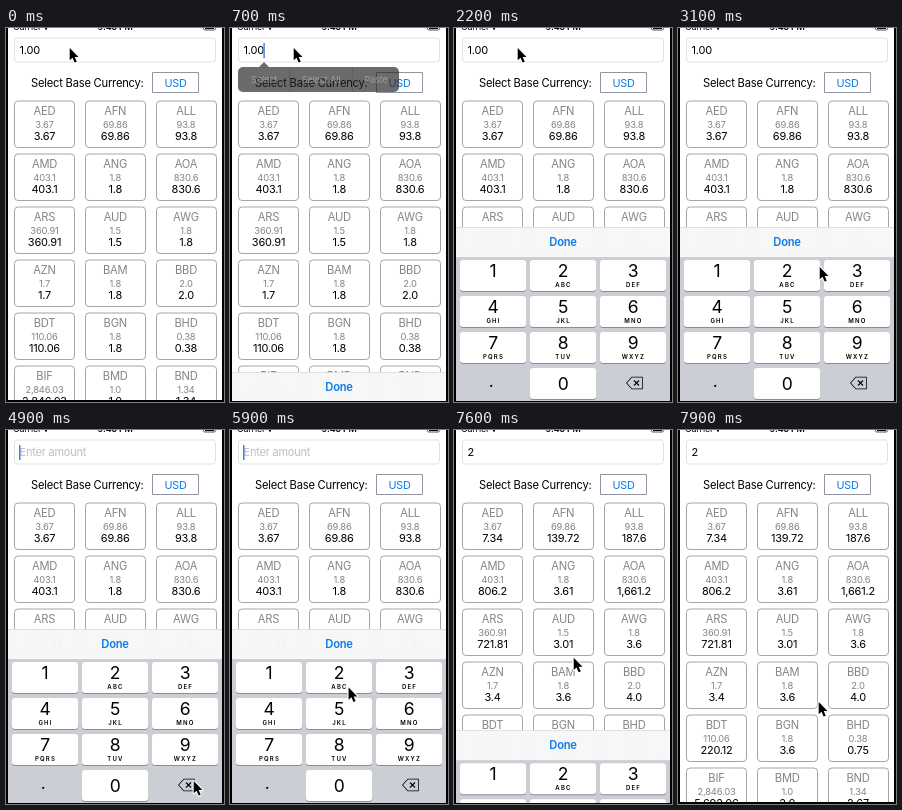
An HTML page with a canvas for the animation above (8000 ms loop, 218x374 px).

```html
<!DOCTYPE html>
<html lang="en">
<head>
<meta charset="utf-8">
<title>Currency converter</title>
<style>
html, body { margin: 0; width: 100%; height: 100%; overflow: hidden; background: #fff; }
canvas { display: block; }
</style>
</head>
<body>
<canvas id="stage" width="218" height="374"></canvas>
<script>
const LOOP = 8000, STEP = 100;
const FIRST_DELETE = 3770, DELETE_GAP = 270, TYPED = 6200, DONE = 7600;
const BLUE = '#0a7aea', GRAY = '#858585', INK = '#000', KEYBOARD = '#cbced5';
const ctx = document.getElementById('stage').getContext('2d');

const rates = Object.entries({
  AED: 3.67, AFN: 69.86, ALL: 93.8, AMD: 403.1, ANG: 1.803, AOA: 830.6,
  ARS: 360.906, AUD: 1.504, AWG: 1.8, AZN: 1.7, BAM: 1.8, BBD: 2,
  BDT: 110.06, BGN: 1.8, BHD: .376, BIF: 2846.03, BMD: 1, BND: 1.337
});
const letters = ' ABC DEF GHI JKL MNO PQRS TUV WXYZ'.split(' ');

// start, end, x, y of each pointer move
const moves = [[2300, 3100, 141, 238], [3100, 3500, 194, 354], [4500, 4900, 187, 350],
  [5200, 6000, 108, 243], [6400, 6900, 112, 212], [7500, 7900, 140, 271]];

const clamp = v => Math.min(1, Math.max(0, v));
const slide = (t, start) => 1 - (1 - clamp((t - start) / 400)) ** 3;
const money = v => v.toLocaleString('en-US', { minimumFractionDigits: 1, maximumFractionDigits: 2 });
const deleted = t => Math.min(4, Math.max(0, Math.floor((t - FIRST_DELETE) / DELETE_GAP) + 1));

function text(str, x, y, size, color = INK, align = 'center', weight = 400, spacing = -.02) {
  ctx.font = `${weight} ${size}px Inter, "Liberation Sans", sans-serif`;
  ctx.letterSpacing = spacing * size + 'px';
  ctx.textAlign = align;
  ctx.fillStyle = color;
  ctx.fillText(str, x, y);
  return ctx.measureText(str).width;
}

function rect(x, y, w, h, fill) {
  ctx.fillStyle = fill;
  ctx.fillRect(x, y, w, h);
}

function box(x, y, w, h, r, fill, stroke) {
  ctx.beginPath();
  ctx.roundRect(x, y, w, h, r);
  if (fill) { ctx.fillStyle = fill; ctx.fill(); }
  if (stroke) { ctx.strokeStyle = stroke; ctx.lineWidth = 1; ctx.stroke(); }
}

function polygon(points, fill, stroke, width = 1) {
  ctx.beginPath();
  points.forEach(p => ctx.lineTo(...p));
  ctx.closePath();
  ctx.lineWidth = width;
  ctx.strokeStyle = stroke;
  ctx.fillStyle = fill;
  if (stroke) ctx.stroke();
  ctx.fill();
}

function drawStatus() {
  text('Carrier', 7, 2, 9, INK, 'left');
  rect(39, 0, 2, 1.5, INK);
  text('9:45 PM', 109, 2, 9, INK, 'center', 600);
  box(197.5, -4.5, 12, 6.5, 1.5, '#fff', '#555');
  rect(199, 0, 9, 1, INK);
}

function caretVisible(t) {
  const tap = t >= TYPED ? TYPED
    : t >= FIRST_DELETE ? FIRST_DELETE + (deleted(t) - 1) * DELETE_GAP : 500;
  const idle = t - tap - 800;
  return t >= 200 && t < DONE && (idle < 0 || idle % 900 >= 400);
}

function drawField(t) {
  box(8.5, 10, 201, 24, 3, '#fff', '#e2e2e2');
  const value = t >= TYPED ? '2' : '1.00'.slice(0, 4 - deleted(t));
  const width = value ? text(value, 13.5, 26, 11, INK, 'left') : 0;
  if (!value) text('Enter amount', 13.5, 26.3, 11, '#bdbdc0', 'left');
  if (caretVisible(t)) rect(13 + width, 15, 1.5, 15, '#4a7fe8');
}

function drawCells(amount) {
  rates.forEach(([code, rate], i) => {
    const x = 8 + i % 3 * 70.75, y = 72.5 + Math.floor(i / 3) * 53, mid = x + 30.5;
    box(Math.round(x) + .5, y + .5, 60, 46.5, 3.5, '#fff', '#a5a5a5');
    text(code, mid, y + 14.7, 11.2, GRAY);
    text(money(rate), mid, y + 27, 9.4, GRAY);
    text(money(rate * amount), mid, y + 39.5, 11);
  });
}

function drawMenu(alpha) {
  ctx.globalAlpha = alpha;
  box(8, 39, 161, 25, 5, '#222');
  polygon([[29, 39], [34, 34], [39, 39]], '#222');
  ctx.globalAlpha = alpha ** 2;
  rect(59, 39, 1, 25, '#555');
  rect(122, 39, 1, 25, '#555');
  [['Select', 34], ['Select All', 91], ['Paste', 146]].forEach(([s, x]) => text(s, x, 55, 9.2, '#ddd'));
  ctx.globalAlpha = 1;
}

function drawKey(digit, sub, x, y, pressed) {
  box(x, y + 1, 66, 31, 3, '#8b8d92');
  box(x, y, 66, 31, 3, pressed ? '#b3b8c1' : '#fff');
  text(digit, x + 33, y + (digit > 0 ? 17 : 22), 17.5);
  text(sub, x + 33.5, y + 27.3, 6, INK, 'center', 600, .2);
}

function drawDelete(y, pressed) {
  polygon([[173, y], [178, y - 5.5], [188, y - 5.5], [188, y + 5.5], [178, y + 5.5]],
    pressed ? INK : KEYBOARD, INK, 1.5);
  ctx.strokeStyle = pressed ? '#fff' : INK;
  ctx.lineWidth = 1.1;
  ctx.beginPath();
  for (const s of [-1, 1]) {
    ctx.moveTo(180, y - 2.5 * s);
    ctx.lineTo(185, y + 2.5 * s);
  }
  ctx.stroke();
}

function drawKeyboard(t) {
  const top = 374 - 30 * slide(t, 100) - 145 * slide(t, 1800) + 175 * slide(t, 7500);
  if (top >= 374) return;
  rect(2, top, 214, 30, 'rgba(247,247,248,.985)');
  rect(2, top, 214, .5, '#c8c8cb');
  text('Done', 109, top + 18.5, 11.2, t >= 7200 && t < 7500 ? '#9cc8f4' : BLUE, 'center', 600);
  rect(2, top + 30, 214, 160, KEYBOARD);
  letters.forEach((sub, i) => drawKey(i + 1, sub, 6 + i % 3 * 70, top + 33 + Math.floor(i / 3) * 36,
    i === 1 && t >= TYPED - 100 && t < TYPED + 100));
  drawKey(0, '', 76, top + 141);
  text('.', 37, top + 160, 17);
  const sincePress = t - FIRST_DELETE + 100;
  drawDelete(top + 156, sincePress >= 0 && sincePress < 4 * DELETE_GAP && sincePress % DELETE_GAP < 120);
}

function drawPointer(t) {
  let x = 63, y = 19;
  for (const [start, end, toX, toY] of moves) {
    const p = clamp((t - start) / (end - start));
    x += (toX - x) * p;
    y += (toY - y) * p;
  }
  ctx.save();
  ctx.translate(x + .7, y + 1);
  ctx.scale(.88, .88);
  ctx.lineJoin = 'round';
  polygon([[0, 0], [0, 14], [3.2, 11.2], [5.6, 16.6], [8, 15.6], [5.7, 10.3], [10, 10.3]], INK, '#fff', 2.4);
  ctx.restore();
}

function draw(t) {
  rect(0, 0, 218, 374, '#fff');
  drawStatus();
  drawField(t);
  text('Select Base Currency:', 25, 58.5, 11.2, INK, 'left');
  box(146.5, 44.5, 46, 20, 0, '#fff', '#8f98a2');
  text('USD', 169.5, 58.5, 10.8, BLUE);
  drawCells(t >= DONE ? 2 : 1);
  drawMenu(clamp(Math.min(t - 500, 2100 - t) / 300));
  rect(0, 372, 218, 2, INK);
  drawKeyboard(t);
  rect(0, 0, 2, 374, INK);
  rect(216, 0, 2, 374, INK);
  rect(0, 373, 218, 1, INK);
  drawPointer(t);
}

function frame() {
  const t = performance.now() % LOOP;
  draw(Math.floor(t / STEP) * STEP);
  requestAnimationFrame(frame);
}
frame();
</script>
</body>
</html>
```
